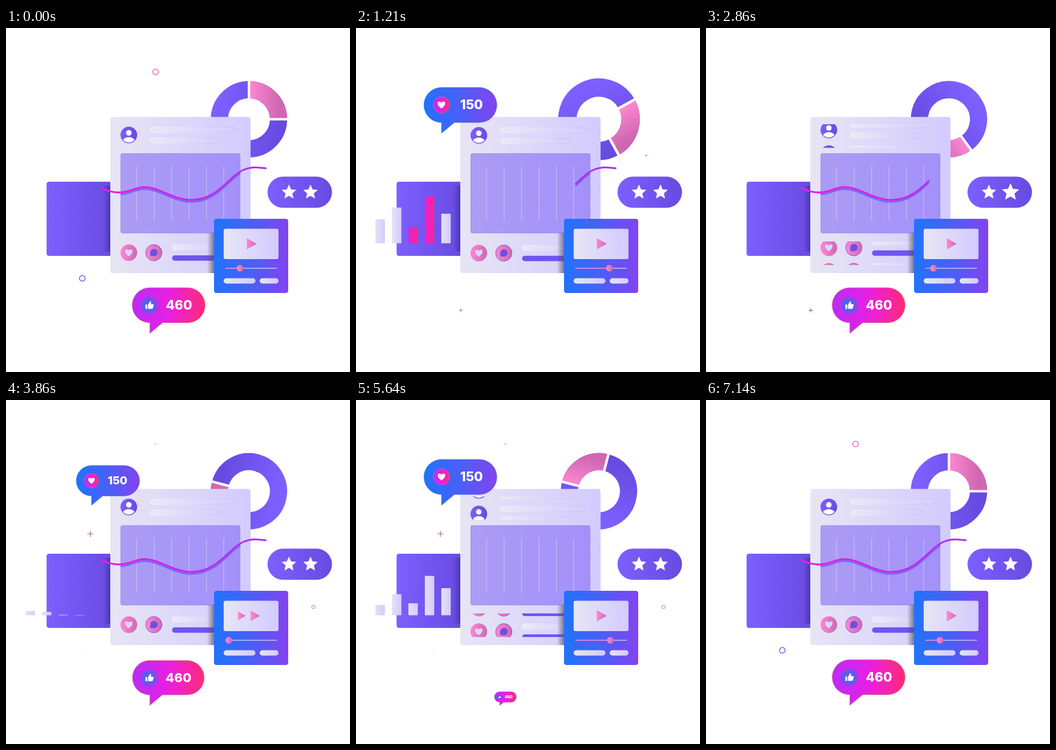
These frames come from a looping animation (640 by 640 pixels, 7.21 s). An HTML page:

```html
<!DOCTYPE html>
<html lang="en">
<head>
<meta charset="utf-8">
<title>Social dashboard</title>
<style>
html, body { margin: 0; width: 100%; height: 100%; overflow: hidden; background: #fff; }
svg { display: block; width: 100vw; height: 100vh; }
text { font: 800 24px Inter, "Open Sans", sans-serif; fill: #fff; text-anchor: middle; }
</style>
</head>
<body>
<svg viewBox="0 0 640 640">
  <defs id="defs">
    <clipPath id="headClip"><rect x="205" y="179" width="240" height="44"/></clipPath>
    <clipPath id="footClip"><rect x="205" y="397" width="240" height="44"/></clipPath>
    <clipPath id="chartClip"><rect x="213" y="233" width="223" height="149"/></clipPath>
    <clipPath id="avatarClip"><circle cx="228.5" cy="199" r="14"/></clipPath>
    <path id="heart" d="M0 6.8C-9.5 0-7.8-6-3.8-6C-1.9-6-.6-5 0-3.8C.6-5 1.9-6 3.8-6C7.8-6 9.5 0 0 6.8Z"/>
    <path id="curve" pathLength="1" fill="none" d="M178 298C190 303 197 306 210 306C230 306 240 296 258 296C285 296 312 320 345 320C395 320 415 274 444 263C457 258 468 259 483 261"/>
    <path id="play" d="M-9-10.5L9.5 0L-9 10.5Z" fill="url(#pink)"/>
  </defs>

  <g id="donut" fill="none" stroke-width="32">
    <circle r="55" stroke="url(#violet)"/>
    <path d="M0-55A55 55 0 0 1 55 0" stroke="url(#pink)"/>
    <path d="M0-73V-37M73 0H37" stroke="#fff" stroke-width="4.6"/>
  </g>

  <rect x="75.5" y="286" width="125" height="138" rx="4.5" fill="url(#violet)"/>
  <rect x="181" y="293" width="13" height="123" fill="url(#violetShade)"/>
  <g id="bars"></g>

  <rect x="194" y="165.500" width="261" height="290.500" rx="4.500" fill="url(#pale)"/>
  <rect x="213.500" y="233.500" width="222" height="148" rx="3" fill="url(#chart)" stroke="#9a8ae8" stroke-width=".8"/>
  <path d="M243 257V358M275.500 257V358M308 257V358M340.500 257V358M373 257V358M405 257V358" stroke="#c6bbfb" stroke-width="1.300"/>

  <g clip-path="url(#headClip)"><g class="feed">
    <g id="head">
      <circle cx="228.500" cy="199" r="15.500" fill="url(#violet)"/>
      <circle cx="228.500" cy="195" r="5.200" fill="#fff"/>
      <ellipse cx="228.500" cy="213" rx="12.500" ry="10" fill="#fff" clip-path="url(#avatarClip)"/>
      <g fill="url(#pill)" stroke="url(#pillEdge)">
        <rect x="268.500" y="184.500" width="157" height="9.500" rx="4.700"/>
        <rect x="268.500" y="204.500" width="131" height="9.500" rx="4.700"/>
      </g>
    </g>
    <use href="#head" y="44"/>
  </g></g>
  <g clip-path="url(#footClip)"><g class="feed">
    <g id="foot">
      <circle cx="228.500" cy="418" r="15.500" fill="url(#pink)"/>
      <use href="#heart" x="228.500" y="418" fill="#dcd6fb"/>
      <circle cx="275" cy="418" r="15.200" fill="url(#pink)" stroke="#6a52e0" stroke-width=".9"/>
      <path d="M268.500 424.500V417A6.800 6.800 0 1 1 275 424.500Z" fill="#6a50e6"/>
      <rect x="309" y="403.500" width="110" height="9.500" rx="4.700" fill="url(#pill)" stroke="url(#pillEdge)"/>
      <rect x="309" y="423" width="110" height="10" rx="5" fill="#7054ee"/>
    </g>
    <use href="#foot" y="44"/>
  </g></g>

  <g clip-path="url(#chartClip)"><use href="#curve" class="trim" y="3.500" stroke="#7d66f5" stroke-width="3.400"/></g>
  <use href="#curve" class="trim" stroke="url(#line)" stroke-width="3.400" stroke-linecap="round"/>

  <rect x="374" y="381" width="13" height="75" fill="url(#shade)"/>
  <rect x="387" y="355" width="138" height="138" rx="4.500" fill="url(#blue)"/>
  <rect x="405" y="373.500" width="102" height="56.500" rx="3.500" fill="url(#pale)"/>
  <use href="#play" class="play"/>
  <use href="#play" class="play"/>
  <path d="M408 447H504" stroke="#cfc8fb" stroke-width="1.600"/>
  <path id="played" stroke="#d78ad6" stroke-width="1.800"/>
  <circle id="knob" cy="447" r="6.200" fill="url(#pink)"/>
  <rect x="405" y="465.500" width="59" height="10" rx="5" fill="url(#pale)"/>
  <rect x="472" y="465.500" width="35" height="10" rx="5" fill="url(#pale)"/>

  <rect x="486.500" y="276.500" width="120" height="58" rx="29" fill="url(#violet)"/>
  <g id="stars" fill="#fff"></g>

  <g id="likes">
    <path d="M33-85.500H70.500A32.700 32.700 0 0 1 70.500-20H24L0 0V-20A32.700 32.700 0 0 1 0-85.500Z" fill="url(#blue)" stroke="#3a8fd0" stroke-width=".5"/>
    <circle cy="-53" r="15.300" fill="url(#hot)" stroke="#e97a9a" stroke-width=".6"/>
    <use href="#heart" y="-53" fill="#fff"/>
    <text x="56" y="-45.500" textLength="0">150</text>
  </g>
  <g id="thumbs">
    <path d="M33-85.500H70.500A32.700 32.700 0 0 1 70.500-20H24L0 0V-20A32.700 32.700 0 0 1 0-85.500Z" fill="url(#hot)" stroke="#f0a070" stroke-width=".8"/>
    <circle cy="-52.500" r="15.400" fill="url(#indigo)"/>
    <path d="M-8-54H-4.500V-46H-8ZM-3-46V-54L1-60Q3.300-59.500 2.700-57L2-54.700H6Q7.600-54.500 7.500-53L6-47.500Q5.600-46 4-46Z" fill="#fff"/>
    <text x="54.500" y="-44.500">460</text>
  </g>
  <g id="sparks" fill="none"></g>
</svg>
<script>
const LOOP = 7.21, SPAN = 7.14;
const $ = id => document.getElementById(id);
const all = selector => [...document.querySelectorAll(selector)];
const clamp = x => Math.min(1, Math.max(0, x));
const ramp = (t, start, length) => clamp((t - start) / length);
const smooth = x => x * x * (3 - 2 * x);
const quad = x => x < .5 ? 2 * x * x : 1 - 2 * (1 - x) ** 2;
const bump = (t, start, length) => Math.sin(Math.PI * ramp(t, start, length));
const place = (el, x, y, scale = 1, turn = 0) => {
  el.setAttribute('transform', `translate(${x} ${y}) rotate(${turn}) scale(${scale})`);
  el.style.visibility = scale > .01 ? 'visible' : 'hidden';
};
const svg = (parent, tag, attrs) => {
  const el = document.createElementNS('http://www.w3.org/2000/svg', tag);
  for (const key in attrs) el.setAttribute(key, attrs[key]);
  return parent.appendChild(el);
};

const gradients = {
  violet: ['#7d5fff', '#674be0'],
  pink: ['#ff87d2', '#cf68b2'],
  pale: ['#e7e5f4', '#d3cbff'],
  chart: ['#ab9cf4', '#a391fa'],
  pill: ['#eae8f5', '#d6cffd'],
  pillEdge: ['#f6f5fc', '#c6bcf6'],
  line: ['#ea1fdc', '#a932f2'],
  blue: ['#2173fb', '#4a5ff6', '#8343ef'],
  hot: ['#b92df8', '#e81fe2', '#ff2a78'],
  indigo: ['#4f5ff6', '#7d4fe6'],
  bar: ['#e4e1f5', '#d3cbfd'],
  hotBar: ['#e81fd2', '#fa2496'],
  violetShade: ['#4a34b000', '#3e2b9ab0'],
  shade: ['#55506000', '#555060b0']
};
for (const id in gradients) {
  const gradient = svg($('defs'), 'linearGradient', { id });
  gradients[id].forEach((color, i, list) =>
    svg(gradient, 'stop', { offset: i / (list.length - 1), 'stop-color': color }));
}
all('text').forEach(el => el.removeAttribute('textLength'));

const bars = [44.5, 66.5, 30.5, 87.5, 55].map((height, i) => ({
  height, el: svg($('bars'), 'rect', { x: 36.3 + 30.6 * i, width: 17.5, rx: 1 })
}));

const starPoints = Array.from({ length: 10 }, (_, i) => {
  const r = i % 2 ? 6.6 : 14.3, a = i * Math.PI / 5;
  return `${r * Math.sin(a)},${-r * Math.cos(a)}`;
}).join(' ');
const stars = [526.4, 566.5].map(x => ({ x, el: svg($('stars'), 'polygon', { points: starPoints }) }));

// x, y, half size, colour, start, duration, ring or plus
const sparks = [
  [278.3, 81.7, 5.3, '#e765b8', 1.46, .695, true],
  [142, 465.7, 5.3, '#5257e6', 1.41, .69, true],
  [572, 385, 5.3, '#d047d2', .15, .67, true],
  [157, 249, 6, '#a947b4', .01, .67],
  [540, 237, 4, '#8074ee', 1.06, .69],
  [195, 525.3, 4, '#7468d8', .74, .7],
  [350, 140, 4.3, '#9a7cf0', .385, .7],
  [417.3, 532.7, 7, '#e878bd', .39, .7]
].map(([x, y, size, stroke, start, length, ring]) => ({
  x, y, start, length,
  el: ring ? svg($('sparks'), 'circle', { r: size, stroke, 'stroke-width': 1.5 })
           : svg($('sparks'), 'path', { d: `M${-size} 0H${size}M0 ${-size}V${size}`, stroke, 'stroke-width': 1.2 })
}));

const knobKeys = [[0, 435.5], [1.3, 472], [3.5, 411], [6.05, 478], [SPAN, 435.5]];
function knobAt(t) {
  const i = Math.max(1, knobKeys.findIndex(key => key[0] >= t));
  const [t0, x0] = knobKeys[i - 1], [t1, x1] = knobKeys[i];
  return x0 + (x1 - x0) * smooth(ramp(t, t0, t1 - t0));
}

function draw(t) {
  const half = t % (SPAN / 2), third = t % (SPAN / 3), quarter = t % (SPAN / 4);

  place($('donut'), 452, 169.7, 1 + .07 * bump(t, .9, .62), 360 * t / SPAN);

  bars.forEach(({ el, height }, i) => {
    const h = height * (quad(ramp(half, .11 + .05 * i, .6)) - quad(ramp(half, 1.75 + .05 * i, .6)));
    el.setAttribute('y', 400.5 - h);
    el.setAttribute('height', Math.max(0, h));
    el.setAttribute('fill', `url(#${t < SPAN / 2 && (i === 2 || i === 3) ? 'hotBar' : 'bar'})`);
  });

  const scroll = -44 * smooth(ramp(third, .14, 1.16));
  all('.feed').forEach(el => place(el, 0, scroll));

  const erasing = half < 2.08;
  const from = erasing ? 1 - (1 - ramp(half, .3, 1.7)) ** 1.78 : 0;
  const to = erasing ? 1 : smooth(ramp(half, 2.16, 1.02));
  all('.trim').forEach(el => {
    el.style.strokeDasharray = `${to - from} 2`;
    el.style.strokeDashoffset = -from;
    el.style.visibility = to - from > .001 ? 'visible' : 'hidden';
  });

  const next = smooth(ramp(t, 3.6, .78));
  const [current, incoming] = all('.play');
  place(current, 457 + 25 * next, 401.5, 1 - next ** 2);
  place(incoming, 432 + 25 * next, 401.5, 1 - (1 - next) ** 5);

  const knob = knobAt(t);
  $('knob').setAttribute('cx', knob);
  $('played').setAttribute('d', `M408 447H${knob}`);

  stars.forEach(({ el, x }, i) =>
    place(el, x, 305.6, 1 + .28 * bump(quarter, .42 + .18 * i, .62)));

  const likes = 1 - (1 - ramp(half, .08, .43)) ** 3 - ramp(half, 2.2, .4) ** 2;
  const thumbs = half < 1.5 ? 1 - ramp(half, .24, .4) ** 2 : 1 - (1 - ramp(half, 2.02, .45)) ** 3;
  place($('likes'), 159, 196, likes);
  place($('thumbs'), 267.3, 568.5, thumbs);

  sparks.forEach(({ el, x, y, start, length }) => {
    const local = (quarter - start + SPAN / 4) % (SPAN / 4);
    place(el, x, y, bump(local, 0, length));
  });
}

const begin = performance.now();
function frame() {
  draw(Math.min((performance.now() - begin) / 1000 % LOOP, SPAN - 1e-6));
  requestAnimationFrame(frame);
}
frame();
</script>
</body>
</html>
```
